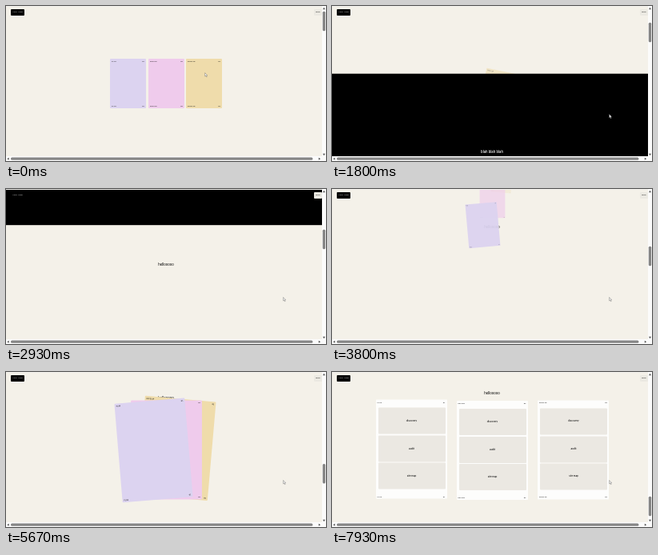
Write an HTML page that moves like this. It is 400x194 px and loops after 8000 ms.

```html
<!DOCTYPE html>
<html lang="en">
<head>
<meta charset="utf-8">
<title>Scrolling cards</title>
<style>
html, body { margin: 0; width: 100%; height: 100%; overflow: hidden; }
#stage {
  position: relative; width: 400px; height: 194px; overflow: hidden;
  background: #f4f1e9; color: #111; font-family: Inter, Roboto, sans-serif;
}
#stage div, #stage svg { position: absolute; box-sizing: border-box; }
.panel { left: 0; top: 0; width: 400px; height: 194px; }
#about { background: #000; color: #fff; }
.title {
  left: 0; width: 400px; text-align: center; font-size: 4.2px; line-height: 6px;
  font-weight: 500; white-space: nowrap;
}
.mono { font: 500 2.3px/3px "Noto Sans Mono", "DejaVu Sans Mono", monospace; white-space: nowrap; }
.face, .flip { left: 0; top: 0; width: 100%; height: 100%; }
.face { border-radius: 1px; }
.back { background: #fdfdfc; }
.item {
  left: 3px; width: 84px; height: 33px; background: #ebe8e2; border-radius: 1px;
  font-size: 2.9px; line-height: 33px; text-align: center; font-weight: 500;
}
.hero { top: 66px; width: 45px; height: 62px; }
.card { top: 36px; width: 89px; height: 124px; }
#logo, #menu { top: 4px; height: 8px; line-height: 7.5px; text-align: center; border-radius: 1px; }
#logo { left: 6px; width: 17px; background: #000; color: #fff; }
#menu { left: 385px; width: 10px; background: #ebe9e2; color: #111; }
.edge { background: #fbfbfb; }
</style>
</head>
<body>
<div id="stage">
  <div id="heroes" class="panel"></div>
  <div id="about" class="panel"><div class="title" style="top:95px">blah blah blah</div></div>
  <div id="services" class="panel"><div class="title" id="hello" style="top:0">hellooooo</div></div>
  <div id="logo" class="mono">SITE LOGO</div>
  <div id="menu" class="mono">MENU</div>
  <div class="edge" style="left:0;top:0;width:400px;height:1px;background:#f1f0ec"></div>
  <div class="edge" style="left:395px;top:0;width:5px;height:194px"></div>
  <div class="edge" style="left:0;top:188px;width:400px;height:6px"></div>
  <svg class="panel" viewBox="0 0 400 194" fill="#858585">
    <rect id="thumb" x="395.8" width="3.4" height="24.6" rx="1.5"/>
    <rect x="6" y="189.6" width="377.4" height="3.2" rx="1.5"/>
    <path d="M396 4.2h3l-1.5-2.4zM396 184.8h3l-1.5 2.4zM3.7 189.7v3l-2.4-1.5zM390.8 189.7v3l2.4-1.5z" fill="#555"/>
    <path id="cursor" d="M0 0v4.3l1-.9.8 1.7.7-.3-.8-1.7h1.3z" fill="#fff" stroke="#555" stroke-width=".4"/>
  </svg>
</div>
<script>
const LOOP = 8000, STEP = 1000 / 15, VH = 194;
const LABELS = ["PLAN", "DESIGN", "DEVELOP"];
const COLORS = ["#dcd3f0", "#efcbec", "#efdcab"];
const ITEMS = ["discovery", "audit", "site map"];

// [time, scroll distance]
const SCROLL = [[1066, 0], [1270, 26], [1930, 130], [2330, 192], [2800, 293], [2930, 342],
  [3670, 480], [4670, 685], [5400, 814], [6270, 901], [6530, 944], [7130, 1060], [7930, 1160]];
// [time, x, y], held until the next row
const CURSOR = [[0, 248.7, 83.7], [66, 261, 101], [133, 275, 121],
  [666, 301, 128], [733, 328, 133], [800, 346.6, 135.6]];

const $ = id => document.getElementById(id);
const clamp = v => Math.min(1, Math.max(0, v));
const mix = (a, b, k) => a + (b - a) * k;
const smooth = k => k * k * (3 - 2 * k);

function add(parent, cls, css = "", text = "") {
  const el = document.createElement("div");
  el.className = cls;
  el.style.cssText = css;
  el.textContent = text;
  parent.append(el);
  return el;
}

function addFace(parent, i, cls, color) {
  const face = add(parent, "face " + cls, color ? `background:${color}` : "");
  for (const edge of ["top:1.6px", "bottom:1.2px"]) {
    add(face, "mono", `left:2px;${edge}`, LABELS[i]);
    add(face, "mono", `right:2px;${edge}`, "0" + (i + 1));
  }
  return face;
}

const heroes = LABELS.map((_, i) => {
  const origin = ["100% 0", "50% 50%", "0 0"][i];
  const el = add($("heroes"), "hero",
    `left:${[130, 178, 225][i]}px;transform-origin:${origin};z-index:${i ? 1 : 2}`);
  addFace(el, i, "", COLORS[i]);
  return el;
});

const cards = LABELS.map((_, i) => {
  const el = add($("services"), "card", `left:${[54.5, 155.5, 257][i]}px;z-index:${3 - i}`);
  const flip = add(el, "flip");
  const front = addFace(flip, i, "front", COLORS[i]);
  const back = addFace(flip, i, "back");
  ITEMS.forEach((name, n) => add(back, "item", `top:${10 + n * 34.7}px`, name));
  return { el, flip, front, back };
});

// Monotone cubic through the table
function curve(table, t) {
  const last = table.length - 1;
  if (t <= table[0][0]) return table[0][1];
  if (t >= table[last][0]) return table[last][1];
  const slope = n => (table[n + 1][1] - table[n][1]) / (table[n + 1][0] - table[n][0]);
  const tangent = n => {
    if (n === 0) return slope(0);
    if (n === last) return slope(last - 1);
    const a = slope(n - 1), b = slope(n);
    return 2 * a * b / (a + b);
  };
  const n = table.findIndex(row => row[0] > t) - 1;
  const [t0, v0] = table[n], [t1, v1] = table[n + 1];
  const h = t1 - t0, k = (t - t0) / h, j = 1 - k;
  return v0 * j * j * (1 + 2 * k) + v1 * smooth(k)
    + h * k * j * (tangent(n) * j - tangent(n + 1) * k);
}

function drawHeroes(scroll) {
  const p = clamp(scroll / (0.75 * VH));
  $("heroes").style.transform = `translateY(${-scroll}px)`;
  $("heroes").style.opacity = mix(1, 0.5, smooth(p));
  heroes.forEach((el, i) => {
    const delay = i * 0.09;
    const k = smooth(clamp((p - delay) / (1 - delay)));
    const side = 1 - i;
    el.style.transform =
      `translate(${side * 90 * k}%,${250 * k}%) rotate(${-side * 15 * k}deg) scale(${mix(1, 0.75, k)})`;
  });
}

function drawCards(p, t) {
  cards.forEach(({ el, flip, front, back }, i) => {
    const delay = i * 0.05;
    const k = clamp((p - delay) / (0.9 - delay));
    const drop = smooth(clamp(k / 0.4));
    const settle = smooth(clamp((k - 0.4) / 0.2));
    const turn = smooth(clamp((k - 0.6) / 0.4));
    const side = (1 - i) * (1 - turn);
    const y = mix(mix(-100, 50, drop), 0, settle);
    const scale = mix(mix(0.25, 0.75, drop), 1, settle);
    const float = (1 - Math.cos((t + 380 - i * 250) / 1000 * Math.PI)) / 2;
    const width = Math.cos(turn * Math.PI);
    el.style.opacity = smooth(clamp(k / 0.2));
    el.style.transform = `translate(${side * 100}%,${y}%) rotate(${-side * 5}deg) scale(${scale})`;
    flip.style.transform = `translateY(${-5 * float}%) scaleX(${Math.abs(width)})`;
    front.style.visibility = width >= 0 ? "visible" : "hidden";
    back.style.visibility = width < 0 ? "visible" : "hidden";
  });
}

function draw(time) {
  const t = Math.floor((time % LOOP + 4) / STEP) * STEP % LOOP;
  const scroll = curve(SCROLL, t);
  const p = clamp((scroll - 2 * VH) / (4 * VH));
  drawHeroes(scroll);
  drawCards(p, t);
  $("about").style.transform = `translateY(${VH - scroll}px)`;
  $("services").style.transform = `translateY(${Math.max(0, 2 * VH - scroll)}px)`;
  $("hello").style.transform = `translateY(${23.5 + 23.5 * (1 - smooth(clamp(p / 0.9)))}px)`;
  $("thumb").setAttribute("y", 6.7 + scroll * 0.1284);
  const [, x, y] = CURSOR.filter(row => row[0] <= t + 1).pop();
  $("cursor").setAttribute("transform", `translate(${x} ${y})`);
}

const start = performance.now();
function tick() {
  draw(performance.now() - start);
  requestAnimationFrame(tick);
}
tick();
</script>
</body>
</html>
```
